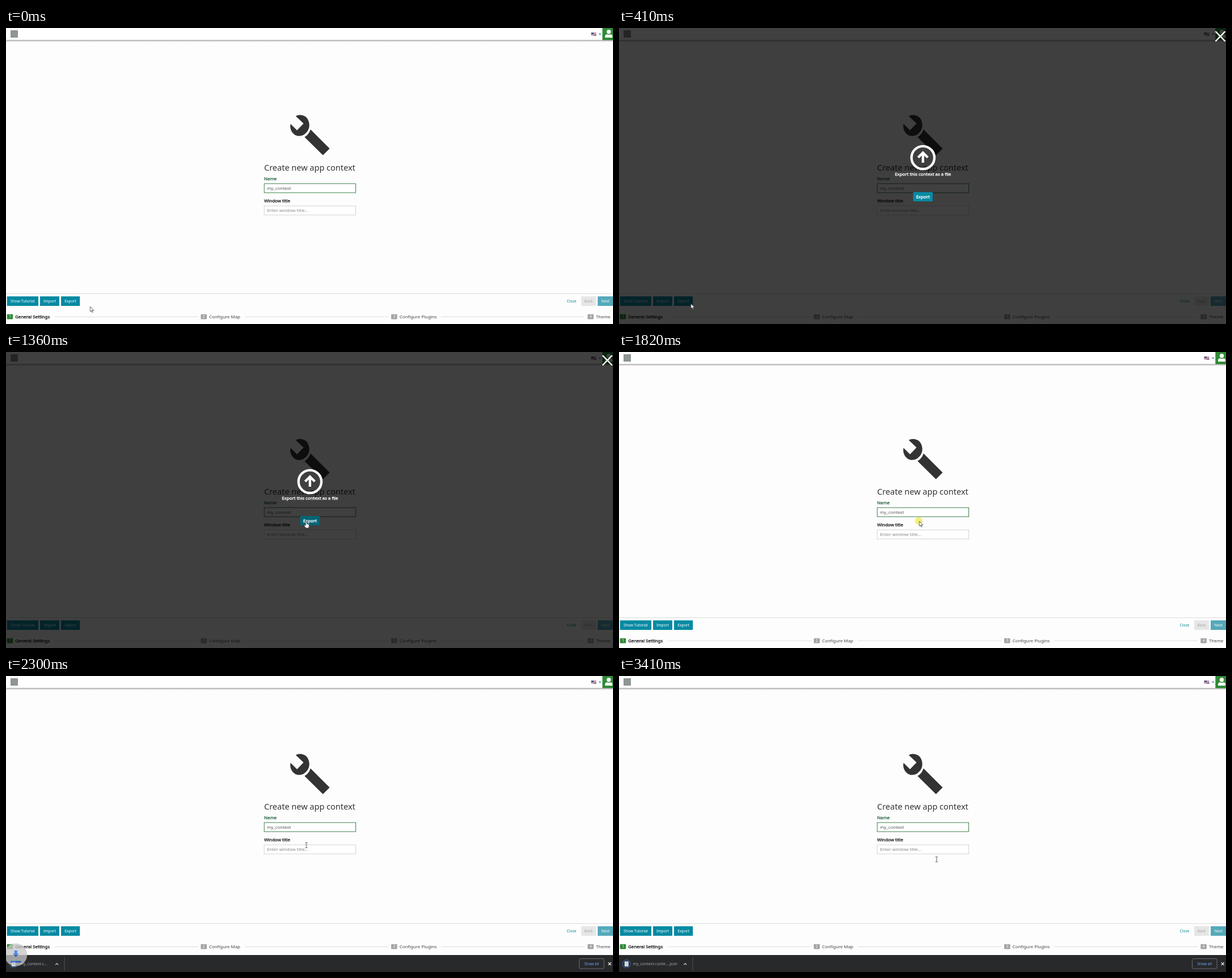
These frames come from a looping animation (1070 by 523 pixels, 3.49 s). An HTML page:

```html
<!DOCTYPE html>
<html lang="en">
<head>
<meta charset="utf-8">
<title>Export a context</title>
<style>
@property --lift { syntax: '<length>'; inherits: true; initial-value: 0px; }
@property --w { syntax: '<length>'; inherits: true; initial-value: 0px; }

html, body { margin: 0; width: 100%; height: 100%; overflow: hidden; background: #fdfdfd; }
svg { display: block; width: 100vw; height: 100vh; overflow: hidden; }
text, .file { font: 7.87px 'Noto Sans', 'Open Sans', sans-serif; }
text { fill: currentColor; }
.bold { stroke: currentColor; stroke-width: .33px; }
.mid { text-anchor: middle; }
.btn { font-size: 6.7px; }
.badge { font-size: 6.4px; color: #fff; text-anchor: middle; }
.white { color: #fff; }
.teal { fill: #078aa3; }
.line { stroke: #ddd; }

/* All motion shares one stepped loop. */
.stage, .hover, .modal, .press, .shelf, .item, .ring, .bubble, .cursor, .cursor * {
  animation: 3490ms step-end infinite;
}
.stage { animation-name: lift; }
.center { transform: translateY(calc(var(--lift) / -2)); }
.bottom { transform: translateY(calc(var(--lift) * -1)); }
.shelf { transform: translateY(calc(32px - var(--lift))); }
.hover { animation-name: hover; }
.modal { animation-name: modal; }
.press { animation-name: press; }
.item { animation-name: open; }
.edge { transform: translateX(calc(var(--w) - 130px)); }
.file {
  width: max(0px, calc(var(--w) - 51px + var(--slack, 2px) * 0));
  line-height: 10px; font-size: 6.9px; color: #a2a4a7;
  white-space: nowrap; overflow: hidden; text-overflow: ellipsis;
}
.ring { animation-name: ring; }
.bubble { animation-name: drop; }
.cursor { animation-name: move; }
.cursor .glow { animation-name: glow; }
.cursor .arrow { animation-name: arrow; }
.cursor .hand { animation-name: hand; }
.cursor .beam { animation-name: beam; }
.arrow, .hand { fill: #fff; stroke: #333; stroke-width: .8; stroke-linejoin: round; }

@keyframes lift {
  0% { --lift: 0px; }
  54.15% { --lift: 12px; }
  56.16% { --lift: 26px; }
  58.16%, 100% { --lift: 32px; }
}
@keyframes hover {
  0% { fill: #078aa3; }
  4.01% { fill: #053643; }
  11.74%, 100% { fill: #078aa3; }
}
@keyframes modal {
  0% { visibility: hidden; }
  11.74% { visibility: visible; }
  52.14%, 100% { visibility: hidden; }
}
@keyframes press {
  0% { fill: #078aa3; }
  38.96%, 100% { fill: #046576; }
}
@keyframes open {
  0% { --w: 0px; }
  54.15% { --w: 20px; }
  56.16% { --w: 42px; }
  58.16% { --w: 60px; }
  60.17% { --w: 74px; }
  62.17% { --w: 86px; }
  64.04% { --w: 95px; }
  65.9% { --w: 103px; }
  67.62% { --w: 109px; }
  69.62% { --w: 115px; }
  71.63% { --w: 120px; }
  73.63% { --w: 124px; }
  75.64% { --w: 128px; }
  77.65%, 100% { --w: 130px; }
}
@keyframes ring {
  0% { opacity: .5; }
  81.66% { opacity: .65; }
  83.66% { opacity: .85; }
  85.67% { opacity: 1; }
  87.67% { opacity: .85; }
  89.68% { opacity: .6; }
  97.7%, 100% { opacity: .7; }
}
@keyframes drop {
  0% { opacity: 0; transform: translateY(-30px); }
  54.15% { opacity: .25; transform: translateY(-27px); }
  56.16% { opacity: .6; transform: translateY(-23px); }
  58.16% { opacity: .84; transform: translateY(-18px); }
  60.17% { opacity: .97; transform: translateY(-13px); }
  62.17% { opacity: 1; transform: translateY(-9px); }
  64.04% { opacity: .92; transform: translateY(-4px); }
  65.9% { opacity: .77; transform: translateY(0); }
  67.62% { opacity: .5; transform: translateY(4px); }
  69.62% { opacity: .13; transform: translateY(9px); }
  71.63%, 100% { opacity: 0; transform: translateY(10px); }
}
@keyframes move {
  0% { transform: translate(148.5px, 492.3px); }
  2% { transform: translate(136px, 489.5px); }
  4.01% { transform: translate(126.8px, 487px); }
  24.92% { transform: translate(150px, 480px); }
  26.93% { transform: translate(225px, 457px); }
  28.93% { transform: translate(325px, 427px); }
  30.94% { transform: translate(415px, 400px); }
  32.95% { transform: translate(480px, 374px); }
  34.95% { transform: translate(512px, 352px); }
  36.96% { transform: translate(521px, 337px); }
  38.96% { transform: translate(529.5px, 299px); }
  97.7%, 100% { transform: translate(559.8px, 324px); }
}
@keyframes glow {
  0% { opacity: 0; }
  9.74% { opacity: .58; }
  11.74% { opacity: 0; }
  52.14% { opacity: .58; }
  54.15% { opacity: .32; }
  56.16% { opacity: .12; }
  58.16%, 100% { opacity: 0; }
}
@keyframes arrow {
  0% { visibility: visible; }
  4.01% { visibility: hidden; }
  11.74% { visibility: visible; }
  38.96% { visibility: hidden; }
  52.14% { visibility: visible; }
  58.16%, 100% { visibility: hidden; }
}
@keyframes hand {
  0% { visibility: hidden; }
  4.01% { visibility: visible; }
  11.74% { visibility: hidden; }
  38.96% { visibility: visible; }
  52.14%, 100% { visibility: hidden; }
}
@keyframes beam {
  0% { visibility: hidden; }
  58.16%, 100% { visibility: visible; }
}
</style>
</head>
<body>
<svg class="stage" viewBox="0 0 1070 523" preserveAspectRatio="none">
  <defs>
    <linearGradient id="shade" x2="0" y2="1">
      <stop stop-color="#aaa"/>
      <stop offset="1" stop-color="#fdfdfd"/>
    </linearGradient>
  </defs>
  <rect width="1070" height="523" fill="#fdfdfd"/>

  <!-- header -->
  <rect width="1070" height="21" fill="#fff"/>
  <rect y="21" width="1070" height="4" fill="url(#shade)"/>
  <rect x="8" y="4" width="13" height="13" fill="#8d9595"/>
  <g>
    <rect x="1031.5" y="8" width="9" height="6" fill="#e9dfe2"/>
    <path d="M1031.5 8h4.5v3.2h-4.5z" fill="#46588f"/>
    <path d="M1036 8.7h4.5M1036 10.6h4.5M1031.5 12.6h9" stroke="#c4505c" stroke-width=".9"/>
    <path d="M1036.5 14v-2.5h4V14z" fill="#46588f" opacity=".6"/>
  </g>
  <path d="M1044.8 9.8h4.4l-2.2 2.4z" fill="#078aa3"/>
  <rect x="1051.3" width="18.7" height="21.5" fill="#2f8a35"/>
  <circle cx="1062.5" cy="6.8" r="3.7" fill="#fff"/>
  <path d="M1056 17v-2.2q0-3.2 3.4-3.6 3.1 1.5 6.2 0 3.4.4 3.4 3.6V17z" fill="#fff"/>

  <!-- form -->
  <g class="center">
    <g fill="#333">
      <path d="M510.8 155.8C517 152.200 527 153.500 531.500 160.500C535.500 167 535.500 175 532.500 180.500C530 185 526 188.500 522.500 189.700C516 192 509.500 190.500 505.500 185.500C501.500 180.500 500.300 175 501.600 169.500L513 180.800L524.500 168.800Z"/>
      <path d="M536.800 179.300L570.500 213L558.700 224.800L526.300 192.800Q533.500 189 536.800 179.300Z"/>
    </g>
    <text x="455" y="252" style="font-size:14.5px" color="#333">Create new app context</text>
    <text class="bold" x="455" y="268.800" color="#2f6a4a">Name</text>
    <rect x="455.200" y="275" width="161.300" height="16" fill="#fff" stroke="#3c7f45"/>
    <text x="460" y="285.700" color="#555">my_context</text>
    <text class="bold" x="455" y="308" color="#222">Window title</text>
    <rect x="455.200" y="314.300" width="161.300" height="16" fill="#fff" stroke="#d4d4d4"/>
    <text x="460" y="325" color="#858585">Enter window title...</text>
  </g>

  <!-- toolbar and steps -->
  <g class="bottom">
    <path class="line" d="M0 469.500H1070"/>
    <rect class="teal" x="1.700" y="474.200" width="55.300" height="16.800"/>
    <rect class="teal" x="60" y="474.200" width="34" height="16.800"/>
    <rect class="hover" x="97" y="474.200" width="33.200" height="16.800"/>
    <g class="white">
      <text class="btn mid" x="29.400" y="484.900">Show Tutorial</text>
      <text class="btn mid" x="77" y="484.900">Import</text>
      <text class="btn mid" x="113.600" y="484.900">Export</text>
    </g>
    <text class="btn mid" x="997" y="484.900" color="#078a96">Close</text>
    <rect x="1014" y="474.200" width="26" height="16.800" fill="#e6e6e6"/>
    <text class="btn mid" x="1027" y="484.900" color="#a8a8a8">Back</text>
    <rect x="1043" y="474.200" width="27" height="16.800" fill="#54a9ba"/>
    <text class="btn mid white" x="1056.500" y="484.900">Next</text>

    <path class="line" d="M86 510.300H339M421 510.300H674M767 510.300H1020"/>
    <rect x="1.700" y="505.700" width="10.500" height="8.800" rx="1" fill="#2f8a35"/>
    <g fill="#a3a3a3">
      <rect x="343.400" y="505.700" width="10.500" height="8.800" rx="1"/>
      <rect x="679" y="505.700" width="10.500" height="8.800" rx="1"/>
      <rect x="1025.300" y="505.700" width="10.500" height="8.800" rx="1"/>
    </g>
    <text class="badge" x="7" y="512.400">1</text>
    <text class="badge" x="348.700" y="512.400">2</text>
    <text class="badge" x="684.300" y="512.400">3</text>
    <text class="badge" x="1030.500" y="512.400">4</text>
    <text class="bold" x="16.300" y="513" color="#222">General Settings</text>
    <g color="#444">
      <text x="358" y="513">Configure Map</text>
      <text x="693.700" y="513">Configure Plugins</text>
      <text x="1040" y="513">Theme</text>
    </g>
  </g>

  <!-- export dialog -->
  <g class="modal">
    <rect width="1070" height="523" fill="#000" fill-opacity=".75"/>
    <path d="M1051.500 6l17 17.500M1068.500 6l-17 17.500" stroke="#fff" stroke-width="2.500"/>
    <g fill="none" stroke="#fff" stroke-width="4.300">
      <circle cx="535.800" cy="229" r="20.200"/>
      <path d="M527.300 228.700l8.500-8.500 8.500 8.500M535.800 221v17"/>
    </g>
    <text class="bold mid white" x="535.800" y="261">Export this context as a file</text>
    <rect class="press" x="518.700" y="290" width="34.300" height="16.200"/>
    <text class="bold mid white" x="535.800" y="300.800">Export</text>
  </g>

  <!-- download shelf -->
  <g class="shelf">
    <rect y="493" width="1070" height="32" fill="#28292b"/>
    <g class="item">
      <circle class="ring" cx="13.200" cy="508.700" r="7" fill="none" stroke="#3f74b5" stroke-width="1.300"/>
      <rect x="9.800" y="504.300" width="7" height="9" rx=".8" fill="#d5e6f3"/>
      <path d="M11.300 506.500h4M11.300 508.500h4M11.300 510.500h4" stroke="#8fb4d6" stroke-width=".7"/>
      <foreignObject x="24.500" y="504" width="90" height="11">
        <div class="file" xmlns="http://www.w3.org/1999/xhtml">my_context-conte....json</div>
      </foreignObject>
      <g class="edge" fill="none">
        <path d="M114.200 510.300l2.500-2.500 2.500 2.500" stroke="#ddd" stroke-width="1.200"/>
        <path d="M130 496.500V521" stroke="#505255"/>
      </g>
    </g>
    <rect x="1010.500" y="499.500" width="43.500" height="17.500" rx="2" fill="none" stroke="#6a6d71"/>
    <text class="mid" x="1032.200" y="510.700" style="font-size:6.550px" color="#6ea8f7">Show all</text>
    <path d="M1061.700 506l5 5M1066.700 506l-5 5" stroke="#eee" stroke-width="1.200"/>
  </g>

  <g class="bubble">
    <circle cx="17.300" cy="492.500" r="20" fill="#c6c6c6"/>
    <path d="M14.800 485h5v5.500h3l-5.500 6-5.500-6h3zM8 503.500h18.500v2.700H8z" fill="#1f69e0"/>
  </g>

  <g class="cursor">
    <circle class="glow" cx="-1.200" cy="-.600" r="6.700" fill="#f0e61e"/>
    <path class="arrow" d="M0 0V8.800L2 7 3.400 10.200 4.800 9.600 3.400 6.500H6.200Z"/>
    <path class="hand" d="M-1.200 7.500V1Q0-.600 1 1V4.600Q4.800 4.800 5 7.200Q5 10 3.800 12H-1Q-2.600 9.800-4 7.600Q-3.400 6-1.200 7.500Z"/>
    <path class="beam" d="M-2-4.500H-.600L0-4 .600-4.500H2M0-4V4M-2 4.500H-.600L0 4 .600 4.500H2" fill="none" stroke="#444" stroke-width=".9"/>
  </g>
</svg>
</body>
</html>
```
